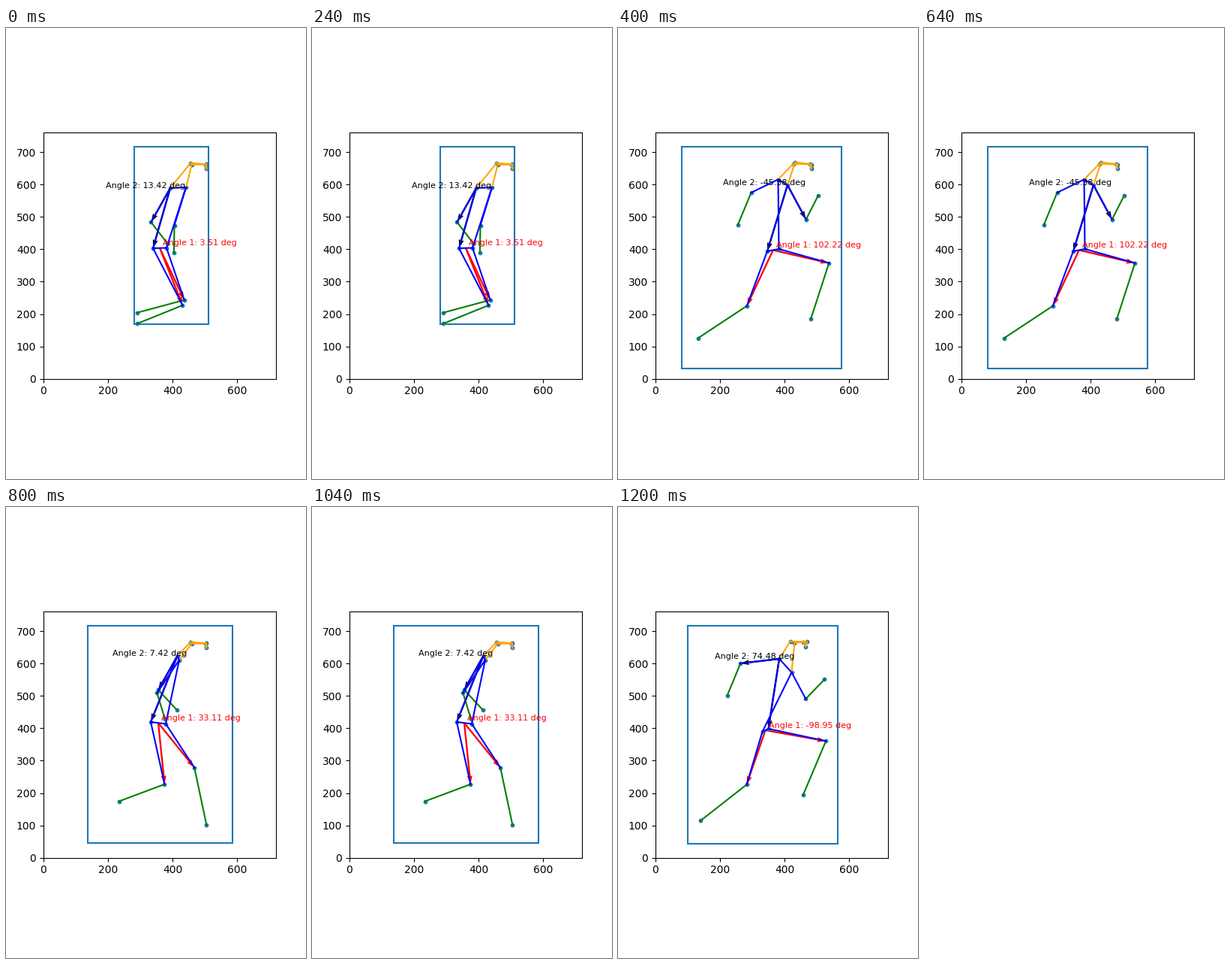
Write a matplotlib script that moves like this. It is 400 px wide and 600 px high and loops after 1.6 s.

```python
import numpy as np
import matplotlib.pyplot as plt
from matplotlib.animation import FuncAnimation

W, H = 720, 760          # data range of the plot
SCALE = 310 / W          # stage pixels per data unit
ORIGIN = np.array([50, 303 + H * SCALE / 2])
BOX_TOP = 158
THIGH = 82, 76.5         # near and far knee, measured from the pelvis

# Key poses of the stride. Joints in stage pixels; limb angles in degrees
# from straight down, positive forwards, near side first.
# "split" and "swing" are the two measured angles.
STRIDE = [
    dict(hips=[(196, 293), (214, 292.5)], shoulders=[(219, 213), (240, 212)],
         knee=21.8, split=3.51, shins=(-68, -75),
         swing=13.42, far_arm=-17, forearms=(37.5, -1), box=(171, 270, 394)),
    dict(hips=[(199, 297), (214.5, 294)], shoulders=[(226, 209), (213.5, 201.5)],
         knee=-25.2, split=102.22, shins=(-56.6, -18),
         swing=-45.38, far_arm=-64, forearms=(153, -22.5), box=(85, 298, 453)),
    dict(hips=[(193, 286), (213, 288.5)], shoulders=[(228.5, 198), (231, 203.5)],
         knee=5.9, split=33.11, shins=(-69.5, 12),
         swing=7.42, far_arm=-34, forearms=(43, 17), box=(109, 302, 447)),
    dict(hips=[(200.5, 295), (192.5, 299)], shoulders=[(215, 202), (231.5, 220)],
         knee=79.9, split=-98.95, shins=(-23, -52),
         swing=74.48, far_arm=28, forearms=(-22.5, 136), box=(93, 293, 448)),
]

fig = plt.figure(figsize=(4, 6), dpi=100)
ax = fig.add_subplot()


def to_data(points):
    """Stage pixels (y down) to plot units (y up)."""
    return (np.array(points, float) - ORIGIN) / [SCALE, -SCALE]


def reach(start, angle, length):
    a = np.radians(angle)
    return start + length * np.array([np.sin(a), np.cos(a)])


def make_head(bob, sway):
    """Nose, eyes and ears; the head nods and turns with the stride."""
    center = np.array([240.3 + 6.6 * bob + 1.2 * sway, 180.2 + 0.5 * bob])
    front = center + [19.4 + 2.5 * sway, 0.7 + 0.8 * sway]
    turn = 2 * sway - 0.8
    ears = [center + [turn, -1], center - [turn, -1]]
    eyes = [front - [turn, 0.3], front + [turn, 0.3]]
    return front + [1, 6], eyes, ears


def make_legs(pose, pelvis):
    legs = []
    knees = pose["knee"], pose["knee"] + pose["split"]
    for hip, angle, size, shin in zip(pose["hips"], knees, THIGH, pose["shins"]):
        knee = reach(pelvis, angle, size)
        # a folded shin is foreshortened
        legs.append([hip, knee, reach(knee, shin, 78 if shin > -60 else 65)])
    return legs


def make_arms(pose, bob):
    arms = []
    dx, dy = np.subtract(pose["hips"][0], pose["shoulders"][0])
    lean = np.degrees(np.arctan2(dx, dy))
    angles = lean - pose["swing"], pose["far_arm"]
    sizes = 52, 46.5 + 6.5 * bob
    for shoulder, angle, size, fore in zip(pose["shoulders"], angles, sizes,
                                           pose["forearms"]):
        elbow = reach(shoulder, angle, size)
        arms.append([shoulder, elbow, reach(elbow, fore, 36 if fore > -10 else 46)])
    return arms


def line(color, *points, **style):
    ax.plot(*to_data(points).T, color=color, lw=1.5, **style)


def arrows(start, tips, color):
    start, tips = to_data(start), to_data(tips)
    d = tips - start
    ax.quiver([start[0]] * 2, [start[1]] * 2, d[:, 0], d[:, 1], color=color,
              angles="xy", scale_units="xy", scale=1)


def label(anchor, shift, text, color):
    ax.text(*(to_data(anchor) + shift), text, color=color, fontsize=8)


def draw(i):
    pose = STRIDE[i]
    bob, sway = np.cos(np.pi * i), np.sin(np.pi * i / 2)
    pelvis = np.mean(pose["hips"], axis=0)
    nose, eyes, ears = make_head(bob, sway)
    legs, arms = make_legs(pose, pelvis), make_arms(pose, bob)

    ax.clear()
    ax.set(xlim=(0, W), ylim=(0, H), aspect="equal")

    left, right, bottom = pose["box"]
    line("C0", (left, BOX_TOP), (right, BOX_TOP), (right, bottom),
         (left, bottom), (left, BOX_TOP), solid_joinstyle="miter")

    arrows(pelvis, [leg[1] for leg in legs], "red")
    arrows(arms[0][0], [arms[0][1], legs[0][0]], "black")
    joints = np.vstack([nose, *eyes, *ears, *arms, *legs])
    ax.scatter(*to_data(joints).T, s=10, color="C0")

    for limb in legs + arms:
        line("green", *limb[1:])
    line("orange", *eyes)
    for eye, ear, arm in zip(eyes, ears, arms):
        line("orange", nose, eye, ear, arm[0])
    line("blue", *pose["hips"])
    line("blue", *pose["shoulders"])
    for arm, leg in zip(arms, legs):
        line("blue", leg[1], leg[0], arm[0], arm[1])

    label(pelvis, (10, 8), f"Angle 1: {pose['split']:.2f} deg", "red")
    label(arms[0][0], (-200, 0), f"Angle 2: {pose['swing']:.2f} deg", "black")
    return ax.get_children()


anim = FuncAnimation(fig, draw, frames=len(STRIDE), interval=400,
                     init_func=lambda: draw(0), repeat=True, repeat_delay=0)
plt.show()
```
